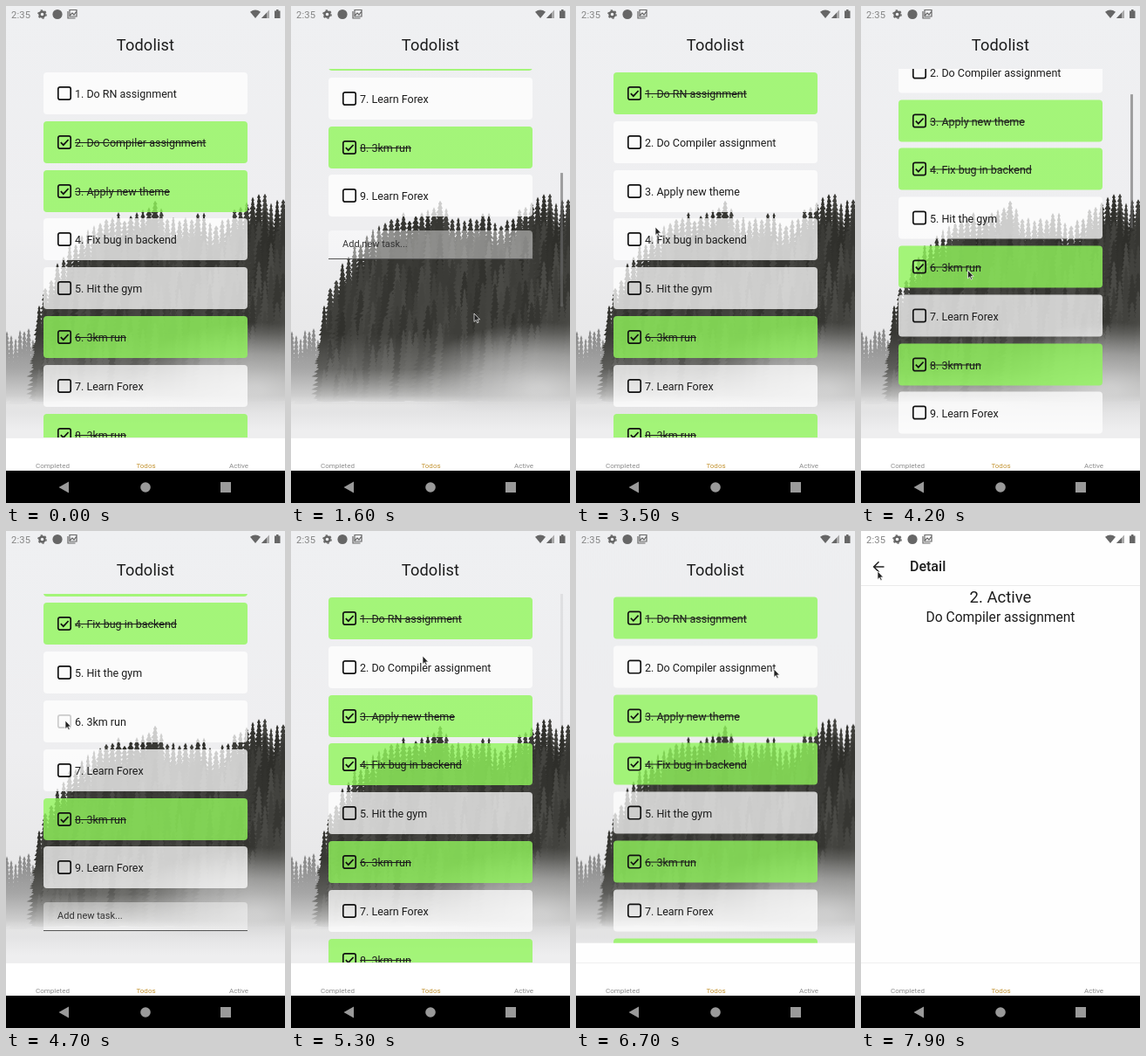
Recreate the animation shown at these times as an HTML page with a canvas. Size 320 by 569 pixels, loop 8 s.

```html
<!DOCTYPE html>
<html lang="en">
<head>
<meta charset="utf-8">
<title>Todolist</title>
<style>
html, body { margin: 0; width: 100%; height: 100%; overflow: hidden; background: #fff; }
body { font: 12.5px Roboto, sans-serif; color: #1c1c1c; }
#stage { position: relative; width: 320px; height: 569px; overflow: hidden; }
#stage div, #stage canvas, #stage svg { position: absolute; }
#view { inset: 0 0 75px; overflow: hidden; background: #fff; }
#home { inset: 0; }
.center { left: 0; width: 320px; text-align: center; white-space: nowrap; }
#title { top: 33px; line-height: 24px; font-size: 18.2px; letter-spacing: .15px; }
#list { left: 0; top: 72px; width: 320px; height: 422px; overflow: hidden; }
#rows { inset: 0; }
.row { left: 43px; width: 234px; height: 48px; border-radius: 4px; background: rgba(255,255,255,.75); }
.row span { position: absolute; left: 36px; line-height: 49px; white-space: nowrap; }
.row svg { left: 15px; top: 15px; fill: none; stroke: #111; stroke-width: 1.7; }
.row path { display: none; }
.done { background: rgba(146,247,92,.8); }
.done span { text-decoration: line-through; }
.done path { display: inline; }
#input { left: 43px; top: 513.5px; width: 218px; height: 32px; padding-left: 16px; border-radius: 4px 4px 0 0;
  border-bottom: 1px solid #555; background: rgba(255,255,255,.42); font-size: 11px; line-height: 32px; color: #333; }
#bar { left: 308.5px; width: 3.5px; height: 153px; background: #6a6a6a; }
#shade { inset: 0; background: #000; }
#detail { inset: 0; background: #fefefe; }
#page { inset: 0; }
#head { left: 0; top: 0; width: 320px; height: 62px; border-bottom: 1px solid #eaeaea; }
#head b { position: absolute; left: 56px; top: 31px; line-height: 20px; font-size: 16px; font-weight: 500; }
#state { top: 64px; line-height: 24px; font-size: 18.5px; }
#task { top: 88px; line-height: 22px; font-size: 15.6px; }
#tabs { left: 0; top: 494px; width: 320px; height: 38px; background: #fff; box-shadow: inset 0 1px #f0f0f0; }
#tabs div { top: 27px; width: 107px; text-align: center; font-size: 8px; line-height: 12px; color: #8c8c8c; }
#tabs .on { color: #c39332; }
#chrome { left: 0; top: 0; }
</style>
</head>
<body>
<div id="stage">
  <div id="view">
    <div id="home">
      <canvas id="forest" width="320" height="506"></canvas>
      <div id="title" class="center">Todolist</div>
      <div id="list">
        <div id="rows"><div id="input">Add new task...</div></div>
        <div id="bar"></div>
      </div>
    </div>
    <div id="shade"></div>
    <div id="detail">
      <div id="page">
        <div id="head">
          <svg width="40" height="60" fill="none" stroke="#222" stroke-width="1.6"><path d="M26.5 41H15M20.5 35.2L14.7 41l5.8 5.8"/></svg>
          <b>Detail</b>
        </div>
        <div id="state" class="center"></div>
        <div id="task" class="center"></div>
      </div>
    </div>
  </div>
  <div id="tabs">
    <div style="left:0">Completed</div>
    <div class="on" style="left:107px">Todos</div>
    <div style="left:213.5px">Active</div>
  </div>
  <svg id="chrome" width="320" height="569" fill="#666">
    <text x="6" y="13.5" font-size="11.2" letter-spacing=".15" fill="#858585">2:35</text>
    <circle cx="41.5" cy="9.5" r="3" fill="none" stroke="#666" stroke-width="2.4"/>
    <circle cx="41.5" cy="9.5" r="4.6" fill="none" stroke="#666" stroke-width="1.5" stroke-dasharray="2.2 2.617"/>
    <circle cx="59" cy="9.5" r="5.6"/>
    <path d="M71 6v8h8.500M73 4.500h8v7.500h-8zM73 11l3-3 2 2 3-4" fill="none" stroke="#666" stroke-width="1.2"/>
    <path d="M280 6.800Q286 2.400 292 6.800L286 14z"/>
    <path d="M302 4.500V14h-9z" fill="#aaa"/><path d="M299 7.700V14h-6z"/>
    <path d="M308 5.500h2V4h2.500v1.500h2V14H308z"/>
    <path d="M0 532h320v37H0z" fill="#000"/>
    <g fill="#9a9a9a"><path d="M72 544.500v13L60.500 551z"/><circle cx="160" cy="551" r="5.800"/><path d="M246 545h12v12h-12z"/></g>
    <path id="cursor" d="M0 0v9.500l2.200-2 1.500 3.300 1.500-.7-1.500-3.200h2.900z" fill="#222" stroke="#fff" stroke-width=".7"/>
  </svg>
</div>
<script>
const $ = id => document.getElementById(id);
const LOOP = 8000, STEP = 100, HEIGHT = 494;
const tasks = ['Do RN assignment', 'Do Compiler assignment', 'Apply new theme', 'Fix bug in backend',
  'Hit the gym', '3km run', 'Learn Forex', '3km run', 'Learn Forex'];
const doneAtStart = [2, 3, 6, 8];

// [time, task number]
const taps = [[2900, 1], [3100, 2], [3300, 3], [3700, 4], [3900, 3], [4600, 6], [4800, 6]];

// [time, offset]
const scrollKeys = [[500, 0], [1600, 329], [1900, 329], [2600, 0], [4000, 0], [4400, 161], [4900, 161], [5200, 0]];

// [time, shown share of the detail page]
const revealKeys = [[5500, 0], [5600, .7], [5700, .96], [5800, 1], [6100, 1], [6200, .25], [6300, .04], [6400, 0],
  [6600, 0], [6700, .045], [6800, .8], [6900, .96], [7000, 1]];

// [time, x, y]
const cursorKeys = [[300, 215, 430], [700, 212, 440], [1600, 210, 352], [1900, 205, 180], [2100, 205, 190],
  [2500, 195, 380], [2900, 68, 100], [3100, 67, 155], [3300, 67, 211], [3500, 91, 253], [3700, 67, 267],
  [3900, 67, 212], [4050, 120, 380], [4350, 125, 225], [4550, 68, 217], [4850, 68, 217], [4950, 140, 120],
  [5150, 150, 200], [5300, 151, 143], [5450, 150, 100], [5600, 148, 100], [5950, 20, 42], [6100, 20, 42],
  [6550, 227, 158], [6800, 227, 158], [7500, 40, 70], [7900, 19, 46]];

function sample(keys, t) {
  const i = keys.findIndex(k => k[0] > t);
  if (i === 0) return keys[0].slice(1);
  if (i < 0) return keys[keys.length - 1].slice(1);
  const a = keys[i - 1], b = keys[i];
  const u = (t - a[0]) / (b[0] - a[0]), e = u * u * (3 - 2 * u);
  return a.slice(1).map((v, n) => v + (b[n + 1] - v) * e);
}

function paintForest() {
  const g = $('forest').getContext('2d');
  let seed = 7;
  const rnd = () => (seed = (seed * 16807) % 2147483647) / 2147483647;
  const fade = (y0, y1, ...stops) => {
    const f = g.createLinearGradient(0, y0, 0, y1);
    stops.forEach((c, i) => f.addColorStop(i / (stops.length - 1), c));
    return f;
  };
  const fill = (style, x, y, w, h) => { g.fillStyle = style; g.fillRect(x, y, w, h); };

  function spruce(x, top, bottom, width, color) {
    const left = [], right = [];
    for (let y = top + 4; y < bottom; y += 5) {
      const w = width * Math.min(1, .12 + (y - top) / 75) / 2;
      right.push([x + w * (.8 + rnd() * .5), y], [x + w * .55, y + 1]);
      left.push([x - w * (.8 + rnd() * .5), y], [x - w * .55, y + 1]);
    }
    g.fillStyle = color;
    g.beginPath();
    g.moveTo(x, top);
    right.concat(left.reverse()).forEach(p => g.lineTo(...p));
    g.fill();
  }

  fill(fade(0, 506, '#eff0f2', '#eeeef0', '#e2e2e2'), 0, 0, 320, 506);
  for (let x = -4; x < 48; x += 5)
    spruce(x, 368 + rnd() * 14, 455, 16, fade(365, 450, '#858585', '#a8a8a8'));

  const ridge = [[34, 340], [45, 318], [60, 288], [80, 266], [95, 250], [110, 242], [125, 229], [145, 238],
    [165, 218], [185, 232], [205, 240], [218, 228], [240, 240], [268, 228], [280, 222], [296, 203], [308, 222], [322, 210]];
  const ridgeAt = x => {
    const i = Math.max(1, ridge.findIndex(p => p[0] >= x)), [x0, y0] = ridge[i - 1], [x1, y1] = ridge[i];
    return y0 + (y1 - y0) * (x - x0) / (x1 - x0);
  };
  for (let row = 0; row < 6; row++)
    for (let x = 38; x < 322; x += 7) {
      const v = 44 + Math.round(rnd() * 26) + row * 2;
      spruce(x, ridgeAt(x) + row * 27 + rnd() * 12, 452, 17 + rnd() * 9, `rgb(${v},${v},${v - 4})`);
    }

  fill(fade(375, 456, 'rgba(205,205,205,0)', 'rgba(205,205,205,.25)', 'rgba(222,222,222,.95)'), 0, 375, 320, 81);
  g.save();
  g.translate(285, 440);
  g.scale(1.9, 1);
  const mist = g.createRadialGradient(0, 0, 5, 0, 0, 78);
  mist.addColorStop(0, 'rgba(212,212,212,.9)');
  mist.addColorStop(.5, 'rgba(200,200,200,.6)');
  mist.addColorStop(1, 'rgba(200,200,200,0)');
  fill(mist, -90, -80, 180, 160);
  g.restore();
  fill(fade(446, 506, 'rgba(228,228,229,0)', '#e4e4e5', '#eeeeef', '#eeeeef'), 0, 446, 320, 60);
}

const rows = tasks.map((name, i) => {
  const row = document.createElement('div');
  row.className = 'row';
  row.style.top = 4 + i * 55.8 + 'px';
  row.innerHTML = `<svg width="18" height="18"><rect x="1.800" y="1.800" width="14.400" height="14.400" rx="2.200"/>
    <path d="M4.800 9.200l3 3 5.800-6.200"/></svg><span>${i + 1}. ${name}</span>`;
  $('rows').append(row);
  return row;
});

function render(t) {
  const [scroll] = sample(scrollKeys, t), [shown] = sample(revealKeys, t), [x, y] = sample(cursorKeys, t);

  rows.forEach((row, i) => {
    const mine = taps.filter(tap => tap[1] === i + 1);
    const flips = mine.filter(tap => tap[0] <= t).length;
    row.classList.toggle('done', doneAtStart.includes(i + 1) !== (flips % 2 === 1));
    row.firstChild.style.opacity = mine.some(([at]) => t < at && t >= at - STEP) ? .2 : 1;
  });
  $('rows').style.transform = `translateY(${-scroll}px)`;

  const near = [-200, 0, 100].some(d => sample(scrollKeys, t + d)[0] !== scroll);
  $('bar').style.transform = `translateY(${scroll * .362}px)`;
  $('bar').style.opacity = !near ? 0 : scroll ? .6 : .12;

  $('home').style.transform = `translateY(${-.0196 * HEIGHT * shown}px)`;
  $('shade').style.opacity = shown * .1;
  $('detail').style.clipPath = `inset(${(1 - shown) * HEIGHT}px 0 0)`;
  $('page').style.transform = `translateY(${.041 * (1 - shown) * HEIGHT}px)`;
  const first = t < 6500;
  $('state').textContent = first ? '1. Completed' : '2. Active';
  $('task').textContent = tasks[first ? 0 : 1];

  $('cursor').setAttribute('transform', `translate(${x} ${y})`);
  $('cursor').style.display = t < 300 ? 'none' : '';
}

paintForest();
const start = performance.now();
function tick() {
  const t = (performance.now() - start) % LOOP;
  render(Math.floor(t / STEP) * STEP);
  requestAnimationFrame(tick);
}
tick();
</script>
</body>
</html>
```
